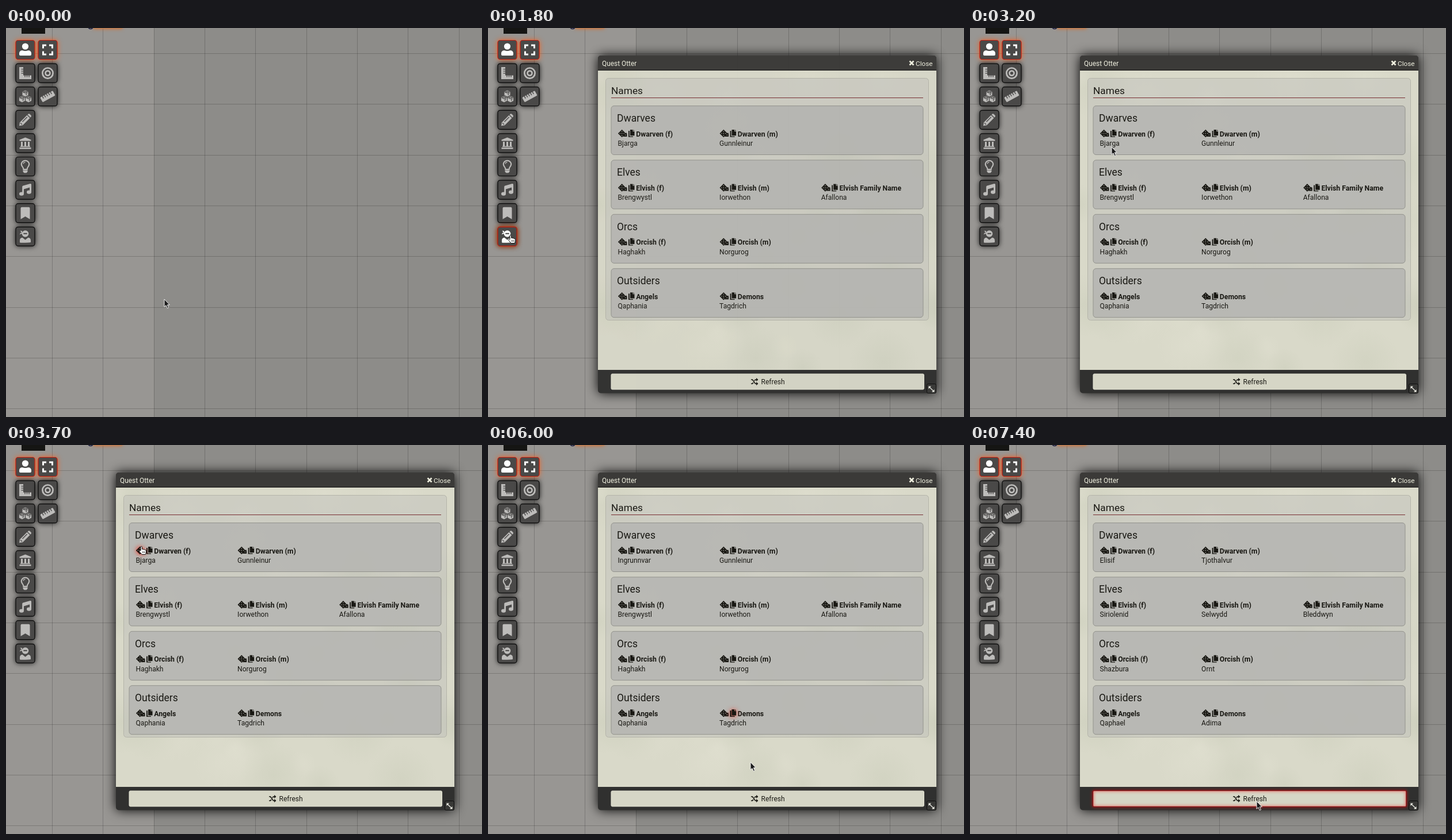
An HTML page with a canvas for the animation above (8000 ms loop, 827 px wide and 677 px high).

```html
<!DOCTYPE html>
<html lang="en">
<head>
<meta charset="utf-8">
<title>Name tables</title>
<style>
html, body { margin: 0; width: 100%; height: 100%; overflow: hidden; background: #8d8c89; }
canvas { display: block; }
</style>
</head>
<body>
<canvas id="stage" width="827" height="677"></canvas>
<script>
const W = 827, H = 677, LOOP = 8000;
const INK = '#191813', PANEL = '#b9b9b4', TOOL = '#4a4948';
const ctx = document.getElementById('stage').getContext('2d');

function layer(paint) {
  const c = document.createElement('canvas');
  c.width = W; c.height = H;
  paint(c.getContext('2d'));
  return c;
}

function box(g, x, y, w, h, r, fill, stroke, lw = 1) {
  g.beginPath();
  g.roundRect(x, y, w, h, r);
  if (fill) { g.fillStyle = fill; g.fill(); }
  if (stroke) { g.strokeStyle = stroke; g.lineWidth = lw; g.stroke(); }
}

function text(g, s, x, y, size = 12.1, weight = 400, color = INK) {
  g.font = `${weight} ${size}px Roboto, sans-serif`;
  g.fillStyle = color;
  g.fillText(s, x, y);
}

function glow(g, color, blur, paint) {
  g.save();
  g.shadowColor = color;
  g.shadowBlur = blur;
  paint();
  g.restore();
}

const fillPath = (g, d) => g.fill(new Path2D(d));
const linePath = (g, d, lw) => { g.lineWidth = lw; g.stroke(new Path2D(d)); };
function cut(g, d, lw) {
  const color = g.strokeStyle;
  g.strokeStyle = TOOL;
  linePath(g, d, lw);
  g.strokeStyle = color;
}
function disc(g, x, y, r) { g.beginPath(); g.arc(x, y, r, 0, 7); g.fill(); }
function ring(g, r, lw) { g.beginPath(); g.arc(0, 0, r, 0, 7); g.lineWidth = lw; g.stroke(); }

// Toolbar icons, drawn around their own centre.
const icons = {
  user(g) {
    disc(g, 0, -6, 5.6);
    fillPath(g, 'M-10.5 8V6.5Q-10.5 1-5 1Q0 3 5 1Q10.5 1 10.5 6.5V8Q10.5 10 8.5 10H-8.5Q-10.5 10-10.5 8Z');
  },
  expand(g) { linePath(g, 'M-8-2.5V-8H-2.5M2.5-8H8V-2.5M8 2.5V8H2.5M-2.5 8H-8V2.5', 3); },
  angle(g) {
    fillPath(g, 'M-10.5-10.5h7V4H10.5V10.5H-10.5Z');
    cut(g, 'M-7-7h4M-7-3.5h4M-7 0h4M-.5 3.5v3.5M3 3.5v3.5M6.5 3.5v3.5', 1.4);
  },
  target(g) { ring(g, 9.1, 2.7); ring(g, 4, 2.7); },
  cubes(g) {
    for (const [x, y] of [[0, -5.3], [-5.6, 4.6], [5.6, 4.6]]) {
      g.save();
      g.translate(x, y);
      fillPath(g, 'M0-5.3L5-3V3L0 5.4-5 3V-3Z');
      cut(g, 'M-3.6-2.3L0-.8 3.6-2.3 0-3.8ZM1.6 3V.8L3.4 0', 1.2);
      g.restore();
    }
  },
  ruler(g) {
    g.rotate(-.5);
    box(g, -12.5, -4.7, 25, 9.4, 1.5, g.fillStyle);
    cut(g, 'M-8-5v4.5M-4-5v4.5M0-5v4.5M4-5v4.5M8-5v4.5', 1.4);
  },
  pencil(g) {
    fillPath(g, 'M-10.5 10.5L-9.4 4.4 3-8 8-3-4.4 9.4Z');
    fillPath(g, 'M4-9L5.5-10.2Q6.5-11 7.7-10L10-7.7Q11-6.5 10.2-5.5L9-4Z');
    cut(g, 'M-5 3.4L3.2-4.8M-8.3 5.5L-5.5 8.3', 1.3);
  },
  temple(g) {
    fillPath(g, 'M0-10L10-6V-4H-10V-6ZM-7.5-2.5h3V5h3V-2.5h3V5h3V-2.5h3V5H8.5V6.5H-8.5V5h1ZM-10 7.5H10V10H-10Z');
  },
  bulb(g) {
    linePath(g, 'M-3.2 5Q-3 2.5-5 .3C-9-5-5-10.3 0-10.3S9-5 5 .3Q3 2.5 3.2 5Z', 2);
    linePath(g, 'M-3.5-4.5Q-3-7.3 0-7.3', 1.2);
    fillPath(g, 'M-4 6.5H4V9L2 11.3H-2L-4 9Z');
  },
  music(g) {
    for (const [x, y] of [[-6.5, 7], [6.5, 4]]) {
      g.beginPath(); g.ellipse(x, y, 4, 3.2, 0, 0, 7); g.fill();
    }
    fillPath(g, 'M-5.3 7V-5.2Q-5.3-6.5-4-7L8.5-10.5Q10.5-11 10.5-9V4H7.6V-4L-2.5-1V7Z');
  },
  bookmark(g) { fillPath(g, 'M-8 10.5V-8.5Q-8-10.5-6-10.5H6Q8-10.5 8-8.5V10.5L0 5.8Z'); },
  masked(g) {
    disc(g, 0, -4.8, 5.8);
    fillPath(g, 'M-5-5L-9-10-5.5-9.5ZM-5-5L-10-3.5-7.5-7Z');
    fillPath(g, 'M-9.5 10V7Q-9.5 2.5-5 2L0 6 5 2Q9.5 2.5 9.5 7V10Q9.5 11-8 11Q-9.5 11-9.5 10Z');
    cut(g, 'M-3.2-5H3.2', 2);
  }
};

function tool(g, name, col, row, active) {
  const cx = 33.5 + col * 39, cy = 38 + row * 40.6;
  glow(g, active ? '#ff5a14' : '#000', 10, () => box(g, cx - 16.5, cy - 16.5, 33, 33, 4, TOOL));
  box(g, cx - 16.5, cy - 16.5, 33, 33, 4, TOOL, active ? '#c01c10' : '#080808', 1.2);
  g.save();
  g.translate(cx, cy);
  g.fillStyle = g.strokeStyle = active ? '#fff' : '#bdbcba';
  icons[name](g);
  g.restore();
}

const scene = layer(g => {
  g.fillStyle = '#8d8c89'; g.fillRect(0, 0, W, H);
  g.fillStyle = '#989693'; g.fillRect(0, 0, 257, H);
  g.fillStyle = 'rgba(0,0,0,.19)';
  for (let i = 0; i < 9; i++) {
    g.fillRect(Math.round(80 + i * 88.35), 0, 1, H);
    g.fillRect(0, Math.round(44 + i * 88.3), W, 1);
  }
  g.fillStyle = '#151513'; g.fillRect(27, -31, 41, 41);
  glow(g, '#e06a20', 6, () => { g.fillStyle = '#c08050'; g.fillRect(152, -6, 50, 7); });
  g.strokeStyle = '#15173a'; g.lineWidth = 1.6;
  g.beginPath(); g.arc(147, -3, 4.5, 0, Math.PI); g.stroke();
  ['user', 'angle', 'cubes', 'pencil', 'temple', 'bulb', 'music', 'bookmark', 'masked']
    .forEach((n, i) => tool(g, n, 0, i, i === 0));
  ['expand', 'target', 'ruler'].forEach((n, i) => tool(g, n, 1, i, i === 0));
});

const groups = [
  ['Dwarves', 'Dwarven (f)', 'Dwarven (m)'],
  ['Elves', 'Elvish (f)', 'Elvish (m)', 'Elvish Family Name'],
  ['Orcs', 'Orcish (f)', 'Orcish (m)'],
  ['Outsiders', 'Angels', 'Demons']
];
const firstNames = [
  ['Bjarga', 'Gunnleinur'], ['Brengwystl', 'Iorwethon', 'Afallona'],
  ['Haghakh', 'Norgurog'], ['Qaphania', 'Tagdrich']
];
const lastNames = [
  ['Elisif', 'Tjothalvur'], ['Siriolenid', 'Selwydd', 'Bleddwyn'],
  ['Shazbura', 'Ornt'], ['Qaphael', 'Adima']
];
const colX = c => 225.5 + c * 176.6;
const rowY = r => 135.5 + r * 94.4;

function dice(g, x, y) {
  g.fillStyle = INK;
  fillShape(g, x, y, 'M7.2-6.8L14 0 7.2 6.8.4 0ZM14.7-1.2H15Q16 0 16 1V5.6H8.8Z');
  g.fillStyle = PANEL;
  for (const [dx, dy] of [[7.2, -3.4], [3.8, 0], [7.2, 0], [10.6, 0], [7.2, 3.4], [13.3, 2.8]]) disc(g, x + dx, y + dy, .75);
}
function copy(g, x, y) {
  g.fillStyle = INK;
  fillShape(g, x, y, 'M21.5-6.5H26V-3.5H29V3.8H21.5ZM27-6.5L29-4.4H27ZM18.5-4.5H20.4V5H26.5V6.3H18.5Z');
}
function fillShape(g, x, y, d) {
  g.save(); g.translate(x, y); fillPath(g, d); g.restore();
}

const dialog = layer(g => {
  glow(g, '#000', 20, () => box(g, 191, 48, 588, 587.5, 5, '#30302f'));
  box(g, 191, 48, 588, 26, [5, 5, 0, 0], '#3b3a38');
  g.fillStyle = '#111'; g.fillRect(191, 73, 588, 1);
  text(g, 'Quest Otter', 198, 65.5, 11.9, 400, '#f0f0e0');
  text(g, 'Close', 743, 65.5, 11.8, 400, '#f0f0e0');
  g.strokeStyle = '#f0f0e0';
  linePath(g, 'M732.5 57.5L739.5 64.5M739.5 57.5L732.5 64.5', 2.6);

  // Mottled paper
  g.save();
  g.beginPath(); g.rect(191, 74, 588, 521); g.clip();
  g.fillStyle = '#d9d9c9'; g.fillRect(191, 74, 588, 521);
  let seed = 11;
  const rnd = () => (seed = seed * 16807 % 2147483647) / 2147483647;
  for (let i = 0; i < 60; i++) {
    const x = 191 + rnd() * 588, y = 74 + rnd() * 521, r = 20 + rnd() * 45;
    const tone = rnd() < .55 ? '196,200,180' : '227,226,211';
    const blot = g.createRadialGradient(x, y, 0, x, y, r);
    blot.addColorStop(0, `rgba(${tone},.32)`);
    blot.addColorStop(1, `rgba(${tone},0)`);
    g.fillStyle = blot;
    g.fillRect(x - r, y - r, 2 * r, 2 * r);
  }
  g.restore();

  box(g, 204.5, 87.5, 561, 421, 5, 'rgba(185,185,182,.4)', '#b5b5aa');
  text(g, 'Names', 214, 115, 17.3);
  g.fillStyle = '#782e32'; g.fillRect(214, 121, 542, 1);
  groups.forEach(([title, ...labels], r) => {
    const y = rowY(r);
    box(g, 214, y, 542, 85, 5, 'rgba(183,183,179,.93)', '#93938d');
    text(g, title, 224, y + 27.5, 17.5);
    labels.forEach((label, c) => {
      dice(g, colX(c), y + 48);
      copy(g, colX(c), y + 48);
      text(g, label, colX(c) + 31.7, y + 53, 12.25, 700);
    });
  });

  box(g, 214, 602, 543.5, 27, 2, '#d6d6c6', '#e2e2d2');
  text(g, 'Refresh', 474.5, 620, 12);
  g.strokeStyle = INK;
  linePath(g, 'M457 612H459.5L464.5 619H467M457 619H459.5L461 617M463 614L464.5 612H467', 1.7);
  g.fillStyle = INK;
  fillPath(g, 'M466 609L469.5 612 466 615ZM466 616L469.5 619 466 622Z');
  box(g, 762.5, 619.5, 16, 16, 2, '#383836', '#0c0c0c');
  g.strokeStyle = g.fillStyle = '#f0f0e8';
  linePath(g, 'M767.5 625.5L773.5 631.5', 1.3);
  fillPath(g, 'M765.5 623.5H770L765.5 628ZM775.5 633.5H771L775.5 629Z');
});

// Time, x, y, pointing hand?
const pointer = [
  [0, 275, 472], [400, 273, 472], [600, 196, 446], [700, 103, 420], [900, 67, 391],
  [1100, 43, 368, 1], [1200, 35, 360, 1],
  [2200, 64, 364], [2300, 105, 361], [2400, 141, 358], [2500, 157, 357],
  [2700, 181, 334], [2800, 215, 296], [3000, 236, 234], [3200, 246, 207], [3300, 249, 191],
  [3500, 236, 180, 1], [3600, 231, 176, 1],
  [5700, 243, 187], [5900, 423, 466, 1], [6000, 456, 552], [6100, 560, 592], [6200, 690, 617], [6300, 741, 626],
  [6600, 690, 624], [6700, 560, 621], [6800, 498, 620]
];
// Hover strengths over time
const diceHover = [[0, 0], [3500, .4], [3600, .8], [3700, 1], [5700, .4], [5900, 0]];
const copyHover = [[0, 0], [5900, 1], [6000, .8], [6100, .35], [6200, 0]];
const refreshHover = [[0, 0], [6200, .6], [6300, 1]];
const at = (track, t) => track.findLast(k => k[0] <= t);

const arrow = new Path2D('M0 0V13.3L3 10.7 5.3 15.7 7.5 14.7 5.3 9.8H9.3Z');
const hand = new Path2D('M3 8V1.8Q3 .5 4.2.5T5.5 1.8V5.3Q7.5 4.6 8 6Q10 5.4 10.4 6.7Q12.6 6.3 12.6 8.3V11L11.3 14.5H5.2L.9 9.7Q.4 8.2 1.6 7.6Z');

function drawPointer(t) {
  const [, x, y, pointing] = at(pointer, t);
  const shape = pointing ? hand : arrow;
  ctx.save();
  ctx.translate(x, y);
  ctx.lineWidth = 1;
  ctx.fillStyle = pointing ? '#fff' : '#1b1b1b';
  ctx.strokeStyle = pointing ? '#111' : '#f4f4f4';
  ctx.fill(shape);
  ctx.stroke(shape);
  if (pointing) linePath(ctx, 'M6.2 9V12M8.2 9V12M10.2 9V12', .7);
  ctx.restore();
}

function drawHover(t) {
  const d = at(diceHover, t)[1], c = at(copyHover, t)[1], b = at(refreshHover, t)[1];
  const red = a => `rgba(255,30,10,${a})`;
  if (d) glow(ctx, red(d), 8, () => dice(ctx, colX(0), rowY(0) + 48));
  if (c) glow(ctx, red(c), 8, () => copy(ctx, colX(1), rowY(3) + 48));
  if (b) {
    ctx.globalAlpha = b;
    glow(ctx, '#f00', 5, () => box(ctx, 213.5, 601.5, 544.5, 28, 2, null, '#8c1418', 1.6));
    ctx.globalAlpha = 1;
  }
}

function drawDialog(t) {
  ctx.globalAlpha = t < 1900 ? .97 : 1;
  ctx.drawImage(dialog, 0, 0);
  const names = t < 7300 ? firstNames : lastNames;
  names.forEach((row, r) => row.forEach((name, c) => {
    if (!r && !c && t >= 4300 && t < 7300) name = t < 5200 ? 'Sigurveig' : 'Ingrunnvar';
    text(ctx, name, colX(c), rowY(r) + 69.5);
  }));
  ctx.globalAlpha = 1;
  drawHover(t);
}

function frame() {
  const t = performance.now() % LOOP;
  ctx.drawImage(scene, 0, 0);
  if (t >= 1100 && t < 2200) tool(ctx, 'masked', 0, 8, true);
  if (t >= 1800) drawDialog(t);
  drawPointer(t);
  requestAnimationFrame(frame);
}
frame();
</script>
</body>
</html>
```
